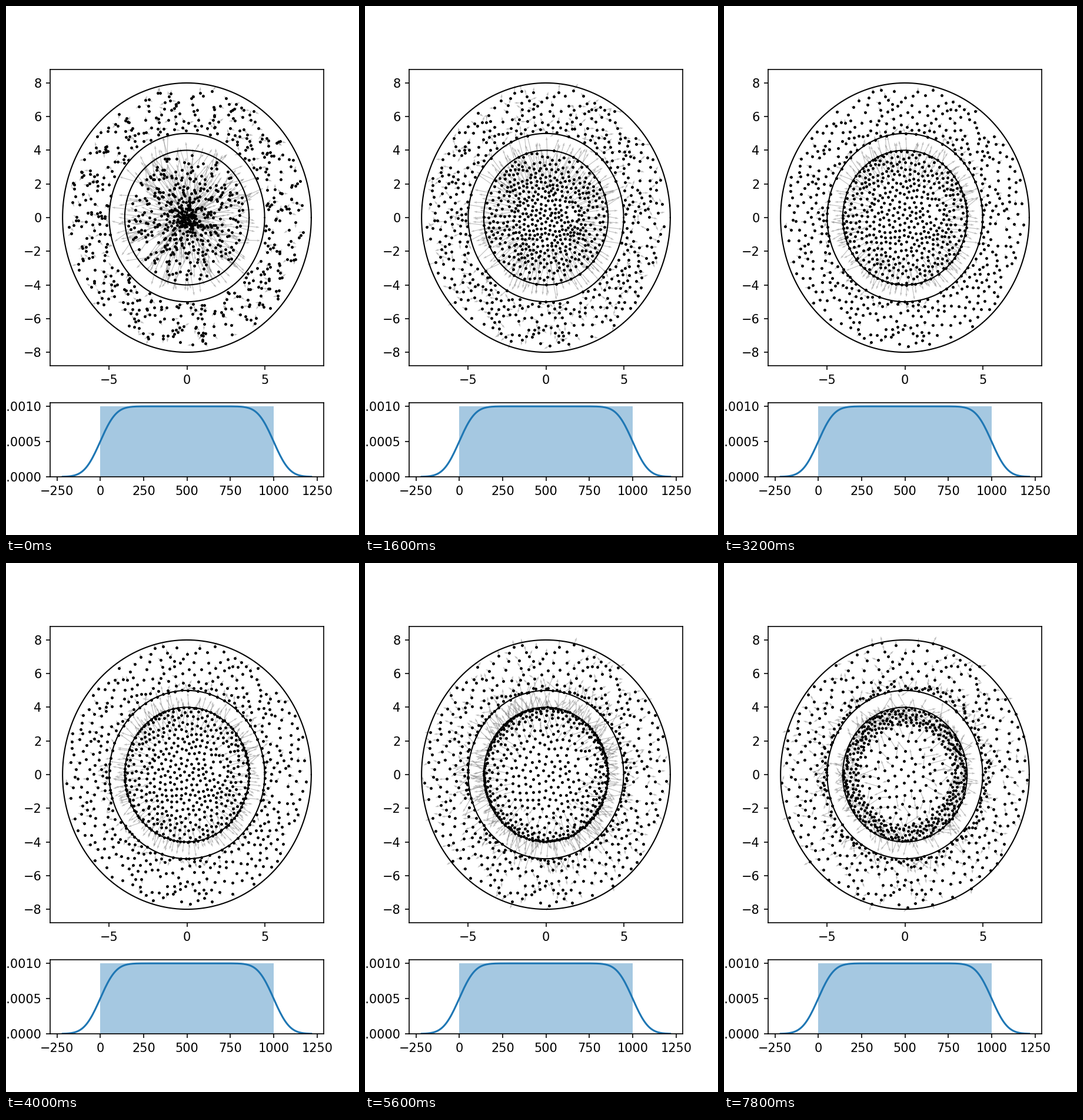
Recreate the animation shown at these times as a matplotlib script. Size 600 px wide and 900 px high, loop 8 s.

```python
import math

import numpy as np
import matplotlib.pyplot as plt
from matplotlib.animation import FuncAnimation
from matplotlib.patches import Rectangle

STEPS = 40
N_IN, N_OUT = 500, 500
R_CORE, R_GAP, R_WALL = 4.0, 5.0, 8.0
KEYS = [0, 4, 12, 20, 28, 34, 39]  # steps at which settings are given
GOLDEN = math.pi * (3 - math.sqrt(5))

rng = np.random.default_rng(12)


def smooth(x):
    x = np.clip(x, 0, 1)
    return x * x * (3 - 2 * x)


def at(t, values):
    return np.interp(t, KEYS, values)


def polar(r, a):
    return np.column_stack([r * np.cos(a), r * np.sin(a)])


def to_polar(p):
    return np.hypot(p[:, 0], p[:, 1]), np.arctan2(p[:, 1], p[:, 0])


def spread(p, gain):
    """Even out the spacing between each point and its six neighbours."""
    d = p[:, None] - p[None]
    dist = np.hypot(d[..., 0], d[..., 1])
    np.fill_diagonal(dist, np.inf)
    near = np.argpartition(dist, 6, axis=1)[:, :6]
    nd = np.maximum(np.take_along_axis(dist, near, 1), 1e-3)
    rows = np.arange(len(p))[:, None]
    size = 1.1 * nd.mean(axis=1, keepdims=True)
    push = np.clip(size - nd, 0, None) / nd
    return p + gain * (d[rows, near] * push[..., None]).sum(axis=1)


# Inner disc: an even core swells to the rim, then thins out while the
# other charges gather in a layer that bounces off the rim.
u = (np.arange(N_IN) + 0.5) / N_IN
depth_in = 0.4 * rng.random(N_IN)
phase_in = rng.uniform(0, math.pi, N_IN)


def inner_radius(t):
    share = at(t, [0.16, 0.25, 0.30, 0.78, 0.39, 0.235, 0.17])
    core = at(t, [0.62, 1.6, 2.3, 3.98, 3.5, 3.1, 2.95])
    rim = at(t, [1.05, 1.03, 0.93, 0.80, 0.68, 0.72, 0.78])
    rest = core + (R_CORE - core) * (u - share) / (rim - share)
    r = np.where(u < share, core * np.sqrt(u / share), rest)
    r = np.minimum(r, R_CORE)
    wave = np.abs(np.sin(phase_in + 0.12 * t))
    near_rim = np.clip((r - 3) / 0.8, 0, 1)
    return r - depth_in * wave * near_rim * smooth((t - 20) / 19)


# Outer ring: the near charges settle on the gap, the far ones on the wall.
v = (np.arange(N_OUT) + 0.5) / N_OUT
r_out = 5.07 + 2.57 * v + rng.normal(0, 0.03, N_OUT)
shift = np.interp(v, [0, 0.25, 0.55, 1], [-0.9, -0.75, -0.2, 0.38])
depth_out = 0.5 * rng.random(N_OUT) ** 1.5


def outer_radius(t):
    r = r_out + shift * (t / 39) ** 1.3
    lift = depth_out * smooth((t - 18) / 21) * smooth((R_GAP - r) / 0.15)
    return np.clip(r, R_GAP, R_WALL) + lift


def simulate(radius, n, scatter, gain, low, high):
    angle = GOLDEN * np.arange(n) + rng.normal(0, scatter, n)
    p = polar(radius(0), angle)
    track = [p]
    for t in range(1, STEPS):
        for _ in range(3 if t < 12 else 1):
            p = spread(p, gain)
        r, a = to_polar(p)
        p = polar(np.clip(r + 0.6 * (radius(t) - r), low, high), a)
        track.append(p)
    return track


inner = simulate(inner_radius, N_IN, 0.3, 0.06, 0, R_CORE)
outer = simulate(outer_radius, N_OUT, 0.12, 0.03, R_GAP, R_WALL)

turn_in, turn_out = rng.normal(size=N_IN), rng.normal(size=N_OUT)
size_in = rng.uniform(0.5, 1.25, N_IN)
size_out = rng.uniform(0.3, 1.2, N_OUT)


def inner_arrows(p, t):
    r, a = to_polar(p)
    start = at(t, [-0.5, 0.7, 1.7, 2.0, 1.8, 1.0, 0.6])
    length = at(t, [1.25, 1.45, 0.9, 0.85, 1.1, 1.05, 0.95])
    noise = at(t, [0.3, 0.15, 0.18, 0.22, 0.35, 0.5, 0.6])
    noise = noise * (1 + smooth((t - 24) / 12) * smooth((r - 2.8) / 0.8))
    length = length * size_in * np.clip((r - start) / 0.8, 0.12, 1)
    return polar(length, a + noise * turn_in)


def outer_arrows(p, t):
    r, a = to_polar(p)
    length = at(t, [0.35, 0.7, 0.22, 0.25, 0.42, 0.45, 0.42])
    edge = at(t, [0, 0, 0.1, 0.3, 0.5, 0.6, 0.5])
    length = (length + edge * np.clip((5.5 - r) / 0.5, 0, 1)) * size_out
    noise = at(t, [1.6, 1.3, 1.0, 0.6, 0.5, 0.7, 0.8])
    return polar(length, a + noise * turn_out)


fig, (ax, low) = plt.subplots(
    2, 1, figsize=(4, 6), dpi=150, gridspec_kw={"height_ratios": [4, 1]})

ax.set(xlim=(-8.8, 8.8), ylim=(-8.8, 8.8),
       xticks=[-5, 0, 5], yticks=range(-8, 9, 2))
ring = np.linspace(0, 2 * math.pi, 400)
for radius in (R_CORE, R_GAP, R_WALL):
    ax.plot(radius * np.cos(ring), radius * np.sin(ring), "k", lw=1)

start = np.vstack([inner[0], outer[0]])
arrows = ax.quiver(start[:, 0], start[:, 1], start[:, 0], start[:, 1],
                   angles="uv", scale_units="x", scale=1, width=0.0025,
                   color="gray", alpha=0.5, zorder=1)
dots, = ax.plot([], [], "ko", ms=2.35, mew=0, zorder=3)

# Density of the indices 0 to 999 with a Gaussian kernel.
count, bw = 1000, 72.5
last = count - 1
x = np.linspace(-3 * bw, last + 3 * bw, 200)
cdf = np.vectorize(lambda z: 0.5 * (1 + math.erf(z / math.sqrt(2))))
density = (cdf((x + 0.5) / bw) - cdf((x - last - 0.5) / bw)) / count
low.add_patch(Rectangle((0, 0), last, 1 / last, fc="C0", alpha=0.4, lw=0))
low.plot(x, density, "C0", lw=1.5)
low.set(xlim=(-289.2, 1288.2), ylim=(0, 1.05 / last),
        xticks=range(-250, 1251, 250), yticks=[0, 0.0005, 0.001])
low.set_yticklabels(["0.0000", "0.0005", "0.0010"])


def draw(t):
    p = np.vstack([inner[t], outer[t]])
    vec = np.vstack([inner_arrows(inner[t], t), outer_arrows(outer[t], t)])
    dots.set_data(p[:, 0], p[:, 1])
    arrows.set_offsets(p)
    arrows.set_UVC(vec[:, 0], vec[:, 1])
    return dots, arrows


anim = FuncAnimation(fig, draw, frames=STEPS, interval=200, repeat=True)
plt.show()
```
